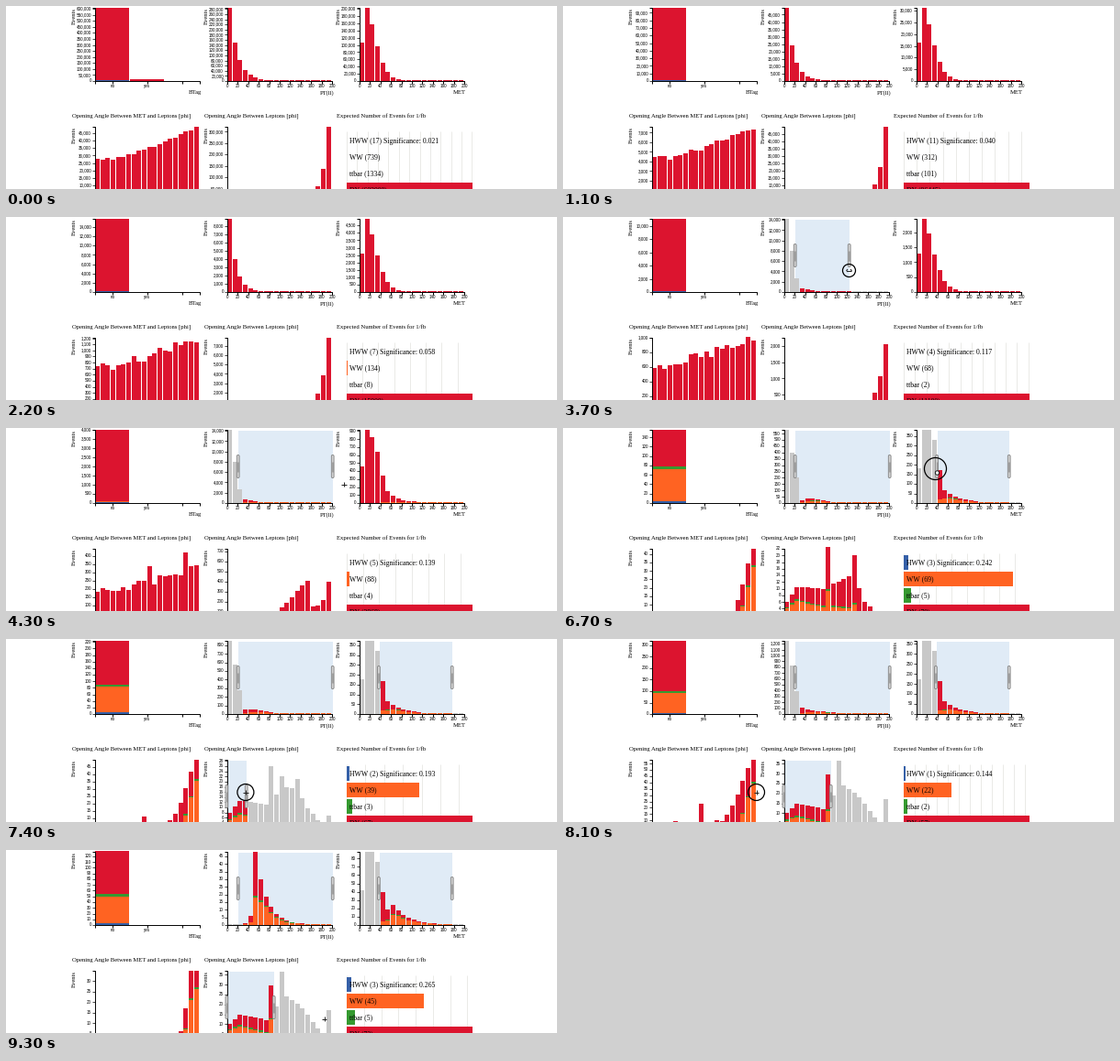
Animation of 600 by 200 pixels, one loop 9.6 s. Source, as a matplotlib script:

```python
import math
import numpy as np
import matplotlib.pyplot as plt
from matplotlib.animation import FuncAnimation
from matplotlib.collections import LineCollection, PolyCollection
from matplotlib.patches import Circle, FancyBboxPatch

FRAMES, STEP = 96, 100
RED, ORANGE, GREEN, BLUE = "#dc142f", "#ff6322", "#359a30", "#3560a8"
GRAY, BRUSH = "#c8c8c8", "#e0ebf6"
SERIF, SANS = "Liberation Serif", "Liberation Sans"
BINS, PITCH, BAR, HEIGHT, WIDTH = 20, 5.67, 4.9, 80, 114

fig = plt.figure(figsize=(6, 2), dpi=100, facecolor="white")
ax = fig.add_axes([0, 0, 1, 1])
ax.set(xlim=(0.5, 600.5), ylim=(200.5, 0.5))
ax.axis("off")

rng = np.random.default_rng(4)
i = np.arange(BINS)
ramp = i / (BINS - 1)


def peak(at, rise, fall, height=80, power=1.5):
    """Two-sided falloff around one bin."""
    d = np.abs(i - at) / np.where(i < at, rise, fall)
    return height * np.exp(-d ** power)


def spike(at, height):
    return np.where(i == at, height, 0)


def noise(amp):
    return rng.uniform(-amp, amp, BINS)


def through(*points):
    return np.interp(i, *zip(*points))


def cut_pt(width, tail):
    return np.where(i < 3, peak(0, 1, width), tail)


def cut_met(tail):
    return np.maximum(peak(1, 1.07, 3.15, power=4), tail)


# Bar heights in pixels for the seven filter stages.
soft_pt = cut_pt(1.41, peak(3, 1, 2, 4, 1))
pt = [peak(0, 1, 1.55, power=1), peak(0, 1, 1.25, power=1), soft_pt, soft_pt,
      cut_pt(1.9, peak(4.8, 2.4, 2.6, 5)),
      cut_pt(1.78, peak(3, 1, 3.5, 6.5, 1)),
      peak(5, 0.48, 2.1, power=1)]
soft_met = cut_met(peak(5, 1, 2.6, 14, 1))
met = [peak(1, 1.33, w) for w in (2.4, 2.5, 2.6)] + [soft_met] * 3
met.append(cut_met(peak(5.6, 1.4, 2.8, 25, 1)))
phi_met = [43 + 36 * ramp ** 1.6 + noise(1.5),
           46 + 32 * ramp ** 1.4 + noise(6),
           45 + 32 * ramp + noise(5),
           20 + 25 * ramp ** 2 + noise(6) + spike(10, 34) + spike(17, 37),
           np.maximum(peak(19, 2.6, 1), 6 + noise(3)),
           np.maximum(peak(19, 4, 1), 9 + noise(6)) + spike(9, 25),
           peak(18.5, 1.6, 1.6, 95)]
edge = through((0, 22), (2, 32), (7, 26), (9, 41), (10, 79), (11, 52), (14, 39),
               (18, 9), (19, 37)) + spike(8, 30)
phi_ll = [peak(19, 1.15, 1, power=1), peak(19, 1.35, 1, power=1),
          peak(19, 1.5, 1, 73, power=1),
          np.maximum(peak(15, 5, 0.85), 14 + noise(4)),
          through((0, 22), (2, 38), (7, 36), (13, 52), (15, 22), (19, 0))
          + spike(8, 43) + spike(13, 21),
          edge, edge]

# Share of each bin that is WW, scaled by how pure each stage is.
PURITY = [0, 0, 0, 0.4, 1, 0.9, 1]
share_met = np.clip((i - 3.5) / 5, 0, 0.6)
share_pt = np.clip((i - 2) / 8, 0, 0.65)
share_phi = np.clip((i - 15) / 5, 0, 0.75)
share_ll = 0.65 - 0.03 * i

# x, baseline, heights, WW share, axis maximum per stage
PANELS = {
    "pt": (241, 82, pt, share_pt, [285e3, 8900, 14200, 14200, 580, 1250, 48]),
    "met": (385, 82, met, share_met, [203e3, 4950, 2460, 375, 382, 365, 88]),
    "phi_met": (97, 212, phi_met, share_phi, [49400, 1210, 1001, 213, 43, 58, 35]),
    "phi_ll": (241, 212, phi_ll, share_ll, [322e3, 7900, 2250, 260, 22, 37, 37]),
}
BTAG_TOP = [608e3, 15.8e3, 11100, 1600, 156, 320, 128]
TICKS = [10, 10, 5, 10, 10, 10, 10]
COUNTS = {
    "HWW": (BLUE, [17, 7, 4, 6, 3, 1, 3]),
    "WW": (ORANGE, [739, 134, 68, 110, 69, 22, 45]),
    "ttbar": (GREEN, [1334, 8, 2, 8, 5, 2, 5]),
    "DY": (RED, [603e3, 15900, 11100, 1490, 79, 57, 73]),
}
SIGNIF = [0.021, 0.058, 0.117, 0.159, 0.242, 0.144, 0.265]

# time -> stage
CLOCK = ([0, 1200, 1300, 2200, 2300, 3700, 4500, 5700, 6700, 8100, 8800],
         [0, 0.55, 0.55, 1, 1.04, 2, 2.7, 3, 4, 5, 6])
# time, x, y of the pointer
PATH = np.array([
    (2900, 300, 120), (3300, 253, 59), (3700, 312, 59), (4100, 356, 59),
    (4800, 400, 70), (5700, 413, 40), (6300, 486, 45), (6450, 413, 45),
    (6700, 406, 45), (7200, 241, 168), (7700, 292, 168), (8100, 211, 168),
    (8400, 190, 172), (8800, 343, 187), (8900, 343, 187), (9300, 347, 185)]).T
# time, radius of the ring shown around a pressed pointer
RING = np.array([
    (3200, 0), (3300, 12), (3500, 7), (4100, 7), (4250, 0), (5800, 0), (5900, 8),
    (6500, 8), (6700, 12), (6850, 0), (7150, 0), (7250, 9), (8100, 9), (8300, 0)]).T


def put(x, y, s, size, ha="left", font=SERIF, va="baseline", **kw):
    return ax.text(x, y, s, fontsize=size * 0.72, family=font, ha=ha, va=va, **kw)


def rect(x0, y0, x1, y1):
    return [(x0, y0), (x1, y0), (x1, y1), (x0, y1)]


def blend(values, pos):
    k = min(int(pos), len(values) - 2)
    return values[k] + (values[k + 1] - values[k]) * (pos - k)


def blend_log(values, pos):
    return math.exp(blend(np.log(values), pos))


def tick_step(top, count):
    step = 10 ** math.floor(math.log10(top / count))
    err = count / top * step
    return step * (10 if err <= 0.15 else 5 if err <= 0.35 else 2 if err <= 0.75 else 1)


def draw_static():
    lines = []
    for x, base in ((97, 82), (241, 82), (385, 82), (97, 212), (241, 212)):
        x += 0.5
        top = base - HEIGHT + 0.5
        lines.append([(x - 3, top), (x, top), (x, base + 0.5)])
        put(x - 22.5, base - 71, "Events", 6.6, "center", rotation=90, va="center")
        if base == 82:
            lines.append([(x, 85.5), (x, 82.5), (x + WIDTH, 82.5), (x + WIDTH, 85.5)])
    for x, name in ((97, "BTag"), (241, "PT(ll)"), (385, "MET")):
        put(x + 116.5, 96.8, name, 6.7, "right")

    ticks = [(116, "no"), (154, "yes"), (192, "")]
    ticks += [(x0 + 11.4 * k, str(20 * k)) for x0 in (241, 385) for k in range(11)]
    for x, name in ticks:
        lines.append([(x + 0.5, 82.5), (x + 0.5, 85)])
        put(x + 0.5, 89.8, name, 4.5, "center", SANS)
    ax.add_collection(LineCollection(lines, colors="black", linewidths=0.7, zorder=4))

    for x, title in ((72, "Opening Angle Between MET and Leptons [phi]"),
                     (216, "Opening Angle Between Leptons [phi]"),
                     (360, "Expected Number of Events for 1/fb")):
        put(x, 122.2, title, 6.6)


def brushes(t):
    """Brushed pixel range of each panel at time t."""
    out = {}
    if t >= 3300:
        out["pt"] = (253.8, np.interp(t, [3300, 3700, 4100], [254, 312, 356]))
    if t >= 5800:
        out["met"] = (np.interp(t, [6450, 6700, 6900], [413, 408.2, 407]),
                      np.interp(t, [5700, 6300], [413, 486]))
    if t >= 7200:
        out["phi_ll"] = (241.5, np.interp(t, [7200, 7700], [242, 292]))
    return out


live = []


def keep(artist):
    live.append(artist)


def fill(polys, color, zorder=2):
    keep(ax.add_collection(PolyCollection(polys, facecolors=color, linewidths=0, zorder=zorder)))


def stroke(lines, color, width, zorder):
    keep(ax.add_collection(LineCollection(lines, colors=color, linewidths=width, zorder=zorder)))


def draw_brush(x0, x1, base):
    top = base - HEIGHT
    fill([rect(x0, top + 1, x1, base)], BRUSH, 1)
    for x in (x0 - 2, x1 - 1.2):
        keep(ax.add_patch(FancyBboxPatch((x, top + 28), 2.8, 25, zorder=6, lw=0.6,
                                         boxstyle="round,pad=0,rounding_size=1.3",
                                         fc="#d2d2d2", ec="#808080")))
        stroke([[(x + d, top + 35), (x + d, top + 46)] for d in (0.9, 1.9)], "#808080", 0.4, 7)


def draw_ticks(x, base, top, pos, marks):
    step = tick_step(top, TICKS[round(pos)])
    for k in range(int(top / step) + 1):
        y = base + 0.5 - k * step / top * HEIGHT
        if y < 203:
            marks.append([(x - 2.5, y), (x + 0.5, y)])
            keep(put(x - 3.5, y + 1.4, f"{k * step:,.0f}", 4.5, "right", SANS))


def draw_btag(pos, bars, marks):
    counts = {color: blend_log(values, pos) for color, values in COUNTS.values()}
    total = sum(counts.values())
    y = 82
    for color, n in counts.items():
        h = HEIGHT * n / total
        bars[color].append(rect(97.5, y - h, 134.5, y))
        y -= h
    bars[RED].append(rect(135.3, 82 - 1.3 * max(0, 1 - 2 * pos), 172.5, 82))
    draw_ticks(97, 82, blend_log(BTAG_TOP, pos), pos, marks)


def draw_histogram(x0, base, heights, share, brush, pos, bars):
    lo, hi = brush or (0, 600)
    if brush:
        draw_brush(lo, hi, base)
    mix = share * blend(PURITY, pos)
    for k, h in enumerate(blend(heights, pos)):
        x = x0 + 0.6 + PITCH * k
        if x < lo or x > hi:
            bars[GRAY].append(rect(x, base - h, x + BAR, base))
            continue
        y = base - h * mix[k]
        y2 = y - min(1.6, 0.1 * h * mix[k])
        bars[ORANGE].append(rect(x, y, x + BAR, base))
        bars[GREEN].append(rect(x, y2, x + BAR, y))
        bars[RED].append(rect(x, base - h, x + BAR, y2))


def draw_expected(pos, bars):
    dy = blend_log(COUNTS["DY"][1], pos)
    scale = 137 / dy
    step = tick_step(dy, 10)
    xs = [371.5 + k * step * scale for k in range(int(dy / step) + 1)]
    stroke([[(x, 137), (x, 201)] for x in xs], "#e6e6e3", 0.6, 0)
    for k, (name, (color, values)) in enumerate(COUNTS.items()):
        n = blend_log(values, pos)
        y = 139 + 18 * k
        bars[color].append(rect(371, y, 371 + n * scale, y + 16.3))
        label = f"{name} ({n:.0f})"
        if name == "HWW":
            label += f" Significance: {blend(SIGNIF, pos):.3f}"
        keep(put(374.8, y + 11, label, 7.75, zorder=5))


def draw_pointer(t):
    if t < PATH[0, 0]:
        return
    x, y = (np.interp(t, PATH[0], row) for row in PATH[1:])
    r = np.interp(t, *RING)
    if r > 2:
        keep(ax.add_patch(Circle((x, y), r, fill=False, ec="black", lw=0.9, zorder=9)))
    if 6300 < t < 6900:
        keep(ax.add_patch(Circle((x + 2, y + 4.5), 2.2, fc="white", ec="black", lw=0.6, zorder=9)))
        return
    glyph = [[(x - 2.8, y), (x + 2.8, y)]]
    if 3300 < t < 4200:
        glyph += [[(x + s * 1.5, y - 1.5), (x + s * 2.8, y), (x + s * 1.5, y + 1.5)]
                  for s in (-1, 1)]
    else:
        glyph.append([(x, y - 2.8), (x, y + 2.8)])
    stroke(glyph, "#222222", 0.7, 9)


def update(frame):
    while live:
        live.pop().remove()
    t = frame * STEP
    pos = float(np.interp(t, *CLOCK))
    ranges = brushes(t)
    bars = {c: [] for c in (RED, ORANGE, GREEN, BLUE, GRAY)}
    marks = []
    draw_btag(pos, bars, marks)
    for name, (x, base, heights, share, tops) in PANELS.items():
        draw_histogram(x, base, heights, share, ranges.get(name), pos, bars)
        draw_ticks(x, base, blend_log(tops, pos), pos, marks)
    draw_expected(pos, bars)
    for color, polys in bars.items():
        if polys:
            fill(polys, color)
    stroke(marks, "black", 0.5, 4)
    draw_pointer(t)
    return live


draw_static()
anim = FuncAnimation(fig, update, frames=FRAMES, interval=STEP, init_func=lambda: [],
                     repeat=True, repeat_delay=0, blit=False)
plt.show()
```
